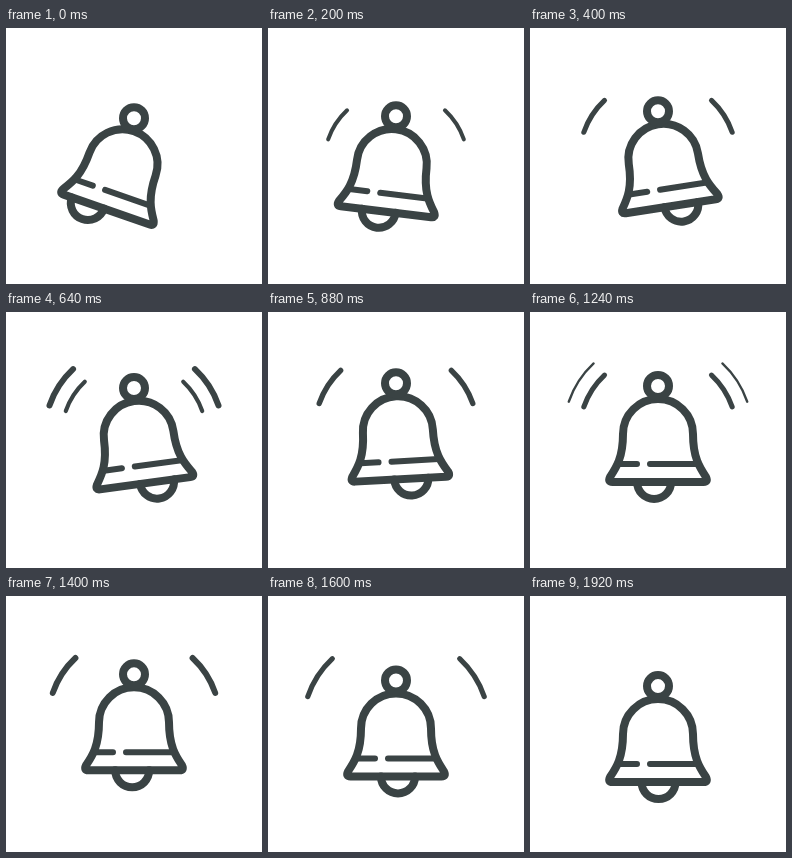
These frames come from a looping animation (256x256 px, 1.96 s). An HTML page with a canvas:

```html
<!DOCTYPE html>
<html lang="en">
<head>
<meta charset="utf-8">
<title>Ringing bell</title>
<style>
html, body { margin: 0; width: 100%; height: 100%; overflow: hidden; background: #fff; }
canvas { display: block; width: 100vw; height: 100vh; }
</style>
</head>
<body>
<canvas id="stage"></canvas>
<script>
const SIZE = 256, LOOP = 1960, STEP = 40, INK = '#3a4344';
const canvas = document.getElementById('stage');
const ctx = canvas.getContext('2d');
const RAD = Math.PI / 180;

// [time, value] pairs
const swing = [[0, 19.2], [440, -9.4], [1160, 0], [LOOP, 0]];
const clapper = [[0, -20], [460, 12], [800, 12], [1260, -4], [1600, 2], [1960, 0.5]];

const ease = u => (1 - Math.cos(Math.PI * u)) / 2;
const clamp = u => Math.max(0, Math.min(1, u));

function track(keys, t) {
  for (let i = 1; i < keys.length; i++) {
    const [t0, a] = keys[i - 1], [t1, b] = keys[i];
    if (t <= t1) return a + (b - a) * ease((t - t0) / (t1 - t0));
  }
  return keys[keys.length - 1][1];
}

function stroke(width, build) {
  ctx.lineWidth = width;
  ctx.beginPath();
  build();
  ctx.stroke();
}

function drawWave(t, start) {
  const u = (t - start) / 750;
  if (u <= 0 || u >= 1) return;
  const r = 71 + 23.7 * u * u * (3 - 2 * u);
  const grow = Math.min(6, 3.6 + 4 * u) * clamp(u / 0.1);
  const width = grow * clamp((1 - u) / 0.17);
  for (const side of [-1, 1]) {
    ctx.save();
    ctx.scale(side, 1);
    stroke(width, () => ctx.arc(0, 46.5, r, -47 * RAD, -19 * RAD));
    ctx.restore();
  }
}

function drawBell(angle, shift) {
  ctx.save();
  ctx.translate(0, 13);
  ctx.rotate(angle * RAD);
  ctx.translate(0, -13);

  stroke(8, () => ctx.arc(shift, 96, 17, 0, Math.PI));
  stroke(8, () => {
    ctx.moveTo(0, 13);
    ctx.arc(0, 48, 35, -Math.PI / 2, 0);
    ctx.bezierCurveTo(35, 72, 42, 82, 48, 91);
    ctx.quadraticCurveTo(50.5, 96, 45.5, 96);
    ctx.lineTo(-45.5, 96);
    ctx.quadraticCurveTo(-50.5, 96, -48, 91);
    ctx.bezierCurveTo(-42, 82, -35, 72, -35, 48);
    ctx.arc(0, 48, 35, Math.PI, Math.PI * 1.5);
  });
  stroke(6, () => {
    ctx.moveTo(-39, 78);
    ctx.lineTo(-21, 78);
    ctx.moveTo(-8, 78);
    ctx.lineTo(39, 78);
  });
  ctx.restore();
  stroke(8, () => ctx.arc(0, 0, 11, 0, Math.PI * 2));
}

function draw(t) {
  const w = Math.round(innerWidth * devicePixelRatio);
  const h = Math.round(innerHeight * devicePixelRatio);
  if (canvas.width !== w || canvas.height !== h) {
    canvas.width = w;
    canvas.height = h;
  }
  ctx.setTransform(w / SIZE, 0, 0, h / SIZE, 0, 0);
  ctx.fillStyle = '#fff';
  ctx.fillRect(0, 0, SIZE, SIZE);
  ctx.strokeStyle = INK;
  ctx.lineCap = ctx.lineJoin = 'round';
  ctx.translate(128, 80.5 + 9.7 * Math.cos(2 * Math.PI * t / LOOP));
  for (const start of [120, 540, 960]) drawWave(t, start);
  drawBell(track(swing, t), track(clapper, t));
}

const origin = performance.now();
function frame() {
  const t = (performance.now() - origin) % LOOP;
  draw(Math.floor(t / STEP) * STEP);
  requestAnimationFrame(frame);
}
frame();
</script>
</body>
</html>
```
